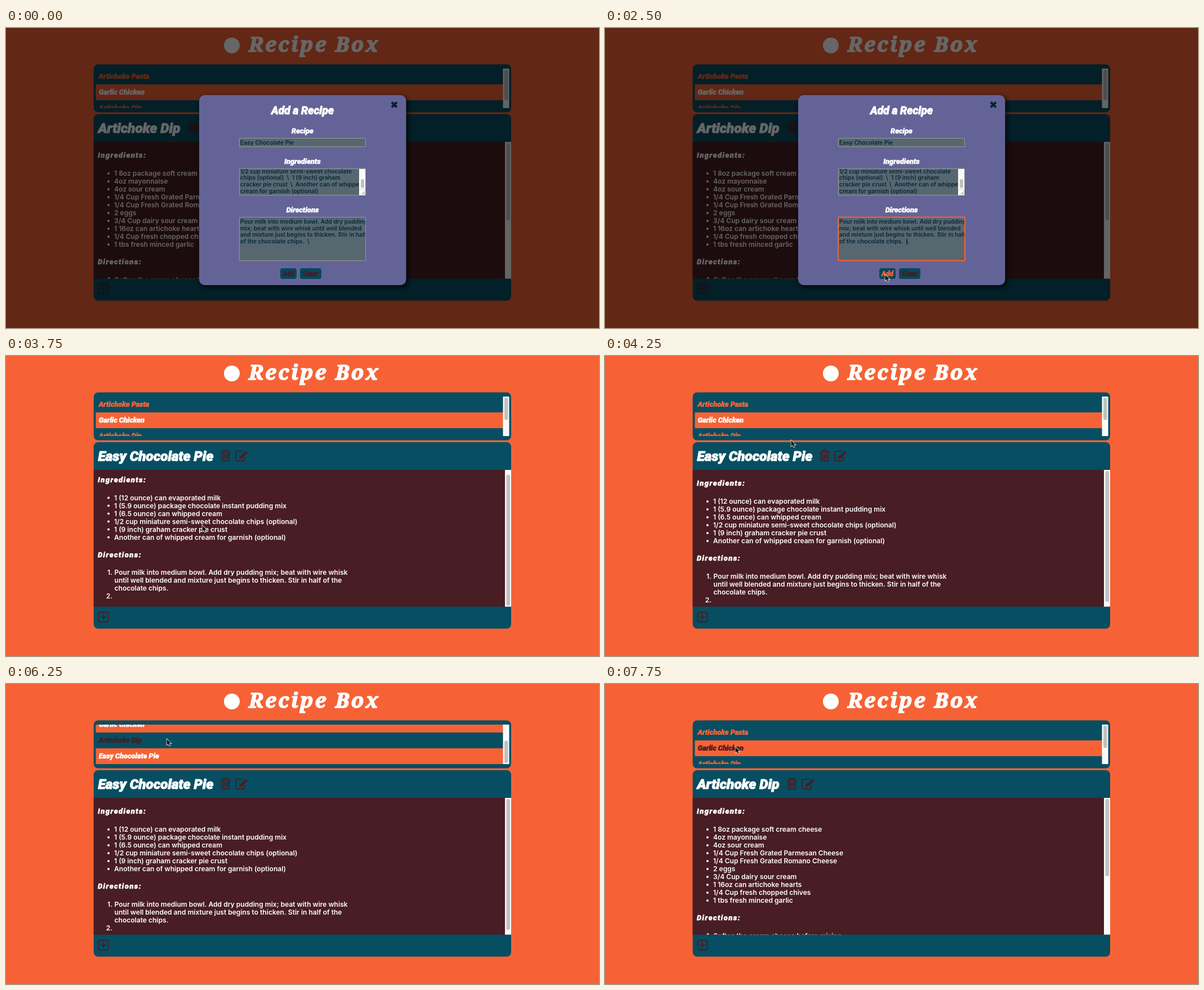
Animation of 1053x532 px, one loop 8 s. Source, as an HTML page with a canvas:

```html
<!DOCTYPE html>
<html lang="en">
<head>
<meta charset="utf-8">
<title>Recipe Box</title>
<style>
html, body { margin: 0; width: 100%; height: 100%; overflow: hidden; background: #f66235; }
canvas { display: block; }
</style>
</head>
<body>
<canvas id="stage" width="1053" height="532"></canvas>
<script>
const ctx = document.getElementById('stage').getContext('2d');
const ORANGE = '#f66235', TEAL = '#074e62', MAROON = '#481d24', WHITE = '#fff', NAVY = '#04232f';
const LOOP = 8000, TICK = 250;

const BODY = '600 12.05px Inter, sans-serif';
const FIELD = '600 10.3px Inter, sans-serif';

const list = ['Artichoke Pasta', 'Garlic Chicken', 'Artichoke Dip', 'Easy Chocolate Pie'];
const pie = {
  title: 'Easy Chocolate Pie', icons: 390, thumb: 232,
  ingredients: ['1 (12 ounce) can evaporated milk', '1 (5.9 ounce) package chocolate instant pudding mix',
    '1 (6.5 ounce) can whipped cream', '1/2 cup miniature semi-sweet chocolate chips (optional)',
    '1 (9 inch) graham cracker pie crust', 'Another can of whipped cream for garnish (optional)'],
  directions: [['1.', 'Pour milk into medium bowl. Add dry pudding mix; beat with wire whisk'],
    ['', 'until well blended and mixture just begins to thicken. Stir in half of the'],
    ['', 'chocolate chips.'], ['2.', '']]
};
const dip = {
  title: 'Artichoke Dip', icons: 332, thumb: 137,
  ingredients: ['1 8oz package soft cream cheese', '4oz mayonnaise', '4oz sour cream',
    '1/4 Cup Fresh Grated Parmesan Cheese', '1/4 Cup Fresh Grated Romano Cheese', '2 eggs',
    '3/4 Cup dairy sour cream', '1 16oz can artichoke hearts', '1/4 Cup fresh chopped chives',
    '1 tbs fresh minced garlic'],
  directions: [['1.', 'Soften the cream cheese before mixing']]
};

// Keyframes: [time, value, value...]
const pointerKeys = [[250, 354, 16], [500, 560, 200], [750, 705, 442], [1000, 598, 382], [1250, 597, 277],
  [1500, 590, 310], [2250, 500, 434], [2500, 497, 437], [3000, 497, 437], [3750, 348, 300], [4250, 330, 149],
  [5000, 315, 116], [5250, 300, 104], [5750, 300, 104], [6250, 285, 97], [6500, 285, 97], [7000, 262, 104],
  [7750, 231, 111]];
const listScrollKeys = [[5000, 0], [5250, 42], [6500, 42], [7000, 0]];
const panelScrollKeys = [[3250, 0], [3750, 6.5], [4000, 6.5], [4250, 0]];

function sample(keys, t) {
  if (t <= keys[0][0]) return keys[0].slice(1);
  const i = keys.findIndex(k => k[0] >= t);
  if (i < 0) return keys[keys.length - 1].slice(1);
  const a = keys[i - 1], b = keys[i], p = (t - a[0]) / (b[0] - a[0]);
  return a.slice(1).map((v, j) => v + (b[j + 1] - v) * p);
}

function rect(x, y, w, h, fill, r = 0) {
  ctx.fillStyle = fill;
  ctx.beginPath();
  ctx.roundRect(x, y, w, h, r);
  ctx.fill();
}

function outline(x, y, w, h, color, width = 1, r = 0) {
  ctx.strokeStyle = color;
  ctx.lineWidth = width;
  ctx.beginPath();
  ctx.roundRect(x, y, w, h, r);
  ctx.stroke();
}

function text(s, x, y, font, fill, align = 'left', spacing = 0) {
  ctx.font = font;
  ctx.fillStyle = fill;
  ctx.textAlign = align;
  ctx.letterSpacing = spacing + 'px';
  ctx.fillText(s, x, y);
}

// Slanted display text, thickened by an outline in its own colour.
function heading(s, x, y, size, fill, align, spacing, family = 'Roboto, sans-serif') {
  text(s, x, y, `italic 900 ${size}px ${family}`, fill, align, spacing);
  ctx.strokeStyle = fill;
  ctx.lineWidth = size * 0.045;
  ctx.lineJoin = 'round';
  ctx.strokeText(s, x, y);
  ctx.lineJoin = 'miter';
}

function stroke(d, color, width) {
  ctx.strokeStyle = color;
  ctx.lineWidth = width;
  ctx.stroke(new Path2D(d));
}

function clipped(x, y, w, h, draw) {
  ctx.save();
  ctx.beginPath();
  ctx.rect(x, y, w, h);
  ctx.clip();
  draw();
  ctx.restore();
}

function scrollbar(x, y, h, thumbY, thumbH) {
  rect(x, y, 11, h, '#fafafa');
  rect(x + 2.5, thumbY, 6.5, thumbH, '#c1c1c1', 3.2);
}

function drawList(count, scroll, pointer) {
  rect(155.7, 64.5, 741.3, 85, TEAL, 8);
  clipped(159.3, 72, 723.7, 70, () => {
    list.slice(0, count).forEach((name, i) => {
      const y = 72 + i * 28 - scroll, odd = i % 2;
      const over = pointer && pointer[0] > 160 && pointer[0] < 882 &&
        pointer[1] >= Math.max(y, 72) && pointer[1] < Math.min(y + 28, 142);
      if (odd) rect(159.3, y, 723.7, 28, ORANGE);
      heading(name, 164.7, y + 18, 12.75, over ? MAROON : odd ? WHITE : ORANGE);
    });
  });
  scrollbar(882.5, 72, 70, 74 + scroll * 0.63, count === 3 ? 54 : 39.5);
}

function drawIcons(x) {
  ctx.save();
  ctx.translate(x, 177);
  stroke('M-9 -6.5H9M-4 -7L-3 -10H3L4 -7M-6.3 -6V8Q-6.3 9.3 -5 9.3H5Q6.3 9.3 6.3 8V-6M-3 -3V6M0 -3V6M3 -3V6',
    MAROON, 2);
  stroke('M31 -8H21Q18 -8 18 -5V6Q18 9 21 9H31Q34 9 34 6V2', MAROON, 1.9);
  stroke('M27 3L37.5 -7', MAROON, 4.6);
  ctx.fillStyle = MAROON;
  ctx.fill(new Path2D('M24 5.5L25 .5L29.5 5Z'));
  ctx.restore();
}

function drawPanel(recipe, scroll) {
  rect(155.7, 152.7, 741.3, 330.8, TEAL, 8);
  heading(recipe.title, 163.5, 186, 24.4, WHITE);
  drawIcons(recipe.icons);
  rect(155.7, 202, 741.3, 242.5, MAROON);
  clipped(156, 202, 730, 242.5, () => {
    ctx.translate(0, -scroll);
    heading('Ingredients:', 163, 230, 13, WHITE, 'left', 1.45);
    recipe.ingredients.forEach((line, i) => {
      const y = 262 + i * 14;
      rect(180, y - 6, 4, 4, WHITE, 2);
      text(line, 192, y, BODY, WHITE);
    });
    const y = 279 + recipe.ingredients.length * 14;
    heading('Directions:', 163, y, 13, WHITE, 'left', 1.45);
    recipe.directions.forEach(([mark, line], i) => {
      text(mark, 189, y + 31.5 + i * 14, BODY, WHITE, 'right');
      text(line, 192.5, y + 31.5 + i * 14, BODY, WHITE);
    });
  });
  scrollbar(886, 202, 242.5, 204 + scroll, recipe.thumb);
  outline(164.5, 454.5, 17, 17, MAROON, 1.8, 3);
  stroke('M173 458V468M168 463H178', MAROON, 1.8);
}

function field(y, h, lines, baseline) {
  rect(414, y, 225, h, '#576770');
  outline(414.5, y + 0.5, 224, h - 1, '#96998f');
  clipped(415, y + 1, 223, h - 2, () =>
    lines.forEach((line, i) => text(line, 416, baseline + i * 11.8, FIELD, '#06283a')));
}

function grip(y) {
  stroke(`M632 ${y - 2}L637 ${y - 7}M635 ${y - 2}L637 ${y - 4}`, '#555', 0.8);
}

function button(label, x, w, color) {
  rect(x, 426, w, 19, '#06485b', 4);
  heading(label, x + w / 2, 439.5, 12, color, 'center');
}

function drawModal(focus, caret, hover) {
  rect(0, 0, 1053, 532, 'rgba(0,0,0,.6)');
  ctx.save();
  ctx.shadowColor = 'rgba(0,0,0,.8)';
  ctx.shadowBlur = 8;
  ctx.shadowOffsetX = ctx.shadowOffsetY = 3;
  rect(343, 119, 367.5, 337, '#646398', 10);
  ctx.restore();
  heading('Add a Recipe', 526.5, 152.5, 19.3, WHITE, 'center');
  stroke('M685 131.5L694 140.5M694 131.5L685 140.5', NAVY, 4);

  heading('Recipe', 526.5, 186.5, 12.9, WHITE, 'center');
  field(195, 16, ['Easy Chocolate Pie'], 206.7);

  heading('Ingredients', 526.5, 240.5, 12.9, WHITE, 'center');
  field(249, 48, ['1/2 cup miniature semi-sweet chocolate', 'chips (optional)  \\  1 (9 inch) graham',
    'cracker pie crust  \\  Another can of whipped', 'cream for garnish (optional)'], 257.5);
  rect(627, 250, 11, 46.5, '#fafafa');
  rect(630, 268, 6, 16, '#c1c1c1', 3);
  stroke('M627 286.5H638', '#ddd', 1);
  grip(297);

  heading('Directions', 526.5, 326.5, 12.9, WHITE, 'center');
  field(335, 78, ['Pour milk into medium bowl. Add dry pudding', 'mix; beat with wire whisk until well blended',
    'and mixture just begins to thicken. Stir in half', 'of the chocolate chips.  \\'], 346.7);
  grip(413);
  if (focus) outline(414, 335.5, 225, 77, ORANGE, 2, 1.5);
  if (caret) rect(535, 373.5, 1, 10.5, NAVY);

  button('Add', 487, 29, hover ? ORANGE : MAROON);
  button('Clear', 522, 38, MAROON);
}

function drawPointer([x, y], beam) {
  ctx.save();
  ctx.translate(x, y);
  if (beam) {
    stroke('M2 0Q4 0 4 2Q4 0 6 0M4 2V11M2 13Q4 13 4 11Q4 13 6 13', '#111', 1);
  } else {
    const arrow = new Path2D('M.5 .5V11L3 8.8L4.8 12.7L6.6 12L4.9 8.2H8.2Z');
    ctx.fillStyle = '#111';
    ctx.strokeStyle = WHITE;
    ctx.lineWidth = 1.4;
    ctx.stroke(arrow);
    ctx.fill(arrow);
  }
  ctx.restore();
}

function draw(t) {
  const modal = t < 2750;
  const pointer = t < 250 ? null : sample(pointerKeys, t);
  const inside = (x, y, w, h) => pointer && pointer[0] >= x && pointer[0] <= x + w &&
    pointer[1] >= y && pointer[1] <= y + h;

  rect(0, 0, 1053, 532, ORANGE);
  rect(387, 17, 28, 28, WHITE, 14);
  heading('Recipe Box', 431, 41.5, 36.5, WHITE, 'left', 3.5, '"Noto Serif", serif');
  drawList(modal ? 3 : 4, sample(listScrollKeys, t)[0], modal ? null : pointer);
  drawPanel(modal || t >= 6500 ? dip : pie, sample(panelScrollKeys, t)[0]);
  if (modal) {
    const focus = t >= 1000;
    drawModal(focus, focus && Math.floor(t / 500) % 2, inside(487, 426, 29, 19));
  }
  if (pointer) drawPointer(pointer, modal && (inside(414, 249, 213, 48) || inside(414, 335, 225, 78)));
}

const start = performance.now();
function frame() {
  const t = (performance.now() - start) % LOOP;
  draw(Math.floor(t / TICK) * TICK);
  requestAnimationFrame(frame);
}
frame();
</script>
</body>
</html>
```
